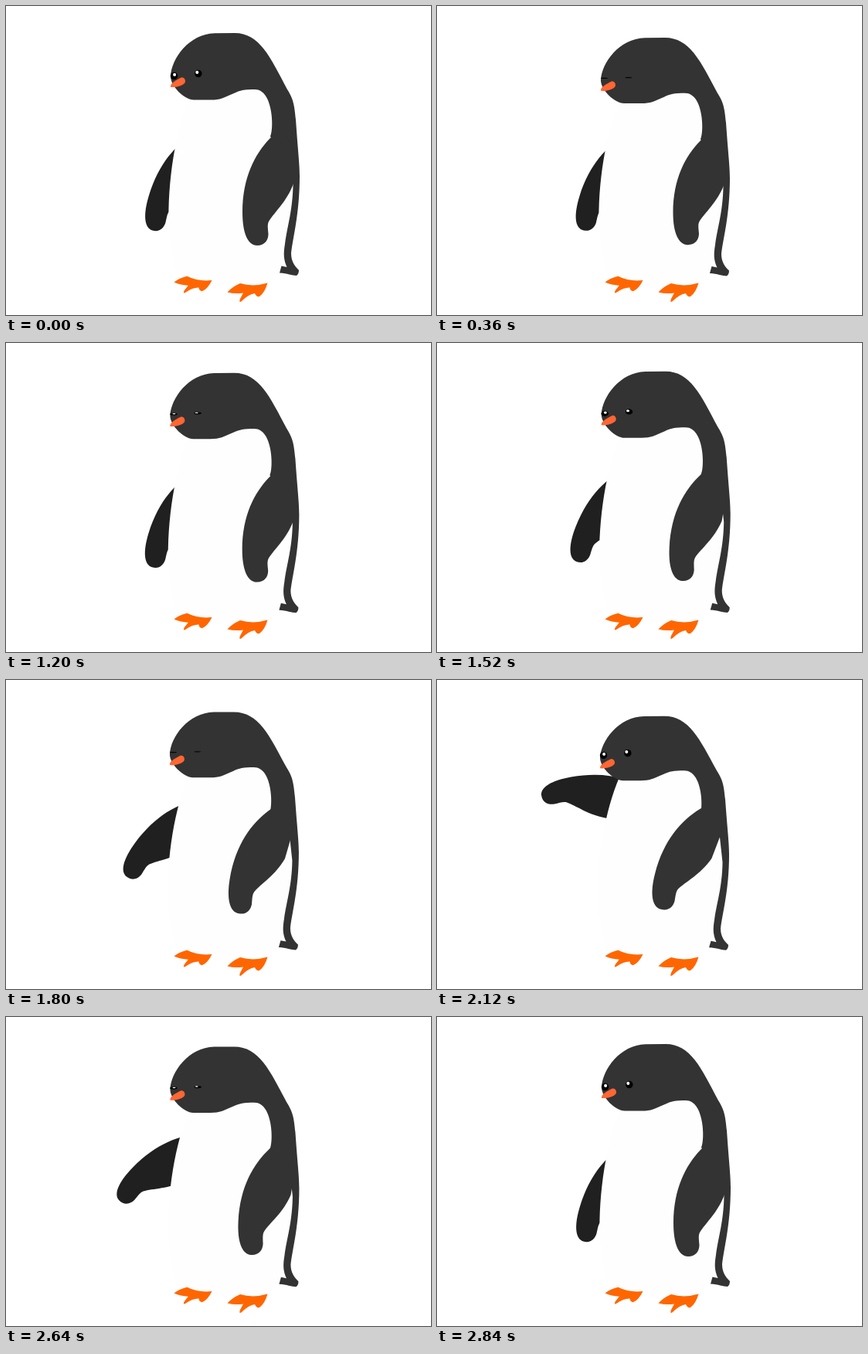
Recreate the animation shown at these times as an HTML page with a canvas. Size 550x400 px, loop 2880 ms.

```html
<!DOCTYPE html>
<html lang="en">
<head>
<meta charset="utf-8">
<title>Waving penguin</title>
<style>
html, body { margin: 0; width: 100%; height: 100%; overflow: hidden; background: #fff; }
canvas { display: block; }
</style>
</head>
<body>
<canvas id="stage" width="550" height="400"></canvas>
<script>
const ctx = document.getElementById('stage').getContext('2d');
const STEP = 40, STEPS = 72, HALF_BOB = 17.75;

const head = 'M213 91C214 68 237 36 270 35.2L296 35C328 35 342 66 364 108';
const back = 'C372 121 373 127 375 147C378 190 380 205 380 220C380 270 371 300 369 320';
const tail = 'C369 331 374 337 379 342Q379 347 376 349C370 349 364 346 354 345.5L356.5 336.5L363.5 338';
const inner = 'C359 328 359 320 361 308C364 285 371 265 371.5 231L368 198L342 169';
const chin = 'C347 160 346 108 322 108C308 108 303 109 295 113C281 119 278 121.5 265 121.5L243 121.5C231 121.5 213 104 213 91Z';
const body = new Path2D(head + back + tail + inner + chin);
const belly = new Path2D('M242 108C222 150 210 215 210.5 275C211 305 216 325 222 350Q285 372 338 359C380 330 376 200 340 100Z');
const beak = new Path2D('M213 104C213 100 220 96 227 92.5C231 91.5 233.5 97 231 100C227 104 219 105.5 213 105Z');

// Wing hangs from 0,0; foot starts at the outer toe
const wing = new Path2D('M-3 -10Q-10 0 -18 7C-37 27 -53 57 -53 102C-53 129 -46 145 -34 145C-24 145 -19.5 138 -19.5 130C-20 123 -21 118 -19 114C-12 102 4 89 13 65L17 30Z');
const foot = new Path2D('M0 0Q5.5 -6.5 16.5 -11.5Q33.5 -6.5 52 -12Q48.5 .5 41.5 5.5Q37.5 6.5 35.5 1.5Q27.5 2.5 18.5 11.5Q14.5 14.5 16.5 8.5L20.5 1Q9.5 2.5 0 0Z');

// Wing angles in degrees: [step, angle], linear between keys
const farSwing = [[0, 17], [35, 17], [44, 31], [53, 80], [62, 66], [71, 17]];
const nearSwing = [[0, 0], [35, 0], [44, 9], [53, 14.5], [62, 5.5], [71, 0]];

const mix = (a, b, k) => a + (b - a) * k;

function at(track, step) {
  const i = track.findIndex(([s]) => s > step);
  if (i < 0) return track[track.length - 1][1];
  const [s0, v0] = track[i - 1], [s1, v1] = track[i];
  return mix(v0, v1, (step - s0) / (s1 - s0));
}

function fill(path, color) {
  ctx.fillStyle = color;
  ctx.fill(path);
}

function within(place, paint) {
  ctx.save();
  place();
  paint();
  ctx.restore();
}

// Squash vertically around a fixed height
function squash(x, pivotY, sy) {
  ctx.translate(x, pivotY * (1 - sy));
  ctx.scale(1, sy);
}

function turn(x, y, degrees) {
  ctx.translate(x, y);
  ctx.rotate(degrees * Math.PI / 180);
}

function ellipse(x, y, rx, ry, color) {
  ctx.fillStyle = color;
  ctx.beginPath();
  ctx.ellipse(x, y, rx, ry, 0, 0, Math.PI * 2);
  ctx.fill();
}

function drawEye(x, y, open, glint) {
  ellipse(x, y, 4.7, 4.8 * open, '#000');
  if (open > 0.2) ellipse(x + glint, y - 1.6 * open, 2, 2.1 * open, '#fff');
}

function draw(step) {
  const beat = step / HALF_BOB, phase = beat % 1;
  const dip = 1 - Math.abs(beat % 2 - 1);
  const open = Math.max(0.13, phase < 0.56 ? 1 - phase / 0.56 : (phase - 0.56) / 0.44);
  const sag = step < 35 ? dip : 0;
  const ride = () => squash(-2 * dip, 370, 1 - 0.0358 * dip);
  const settle = () => squash(-sag, 278, 1 - 0.05 * sag);

  ctx.fillStyle = '#fff';
  ctx.fillRect(0, 0, 550, 400);

  within(() => {
    settle();
    turn(277, 176, at(farSwing, step));
    ctx.translate(-19, -7);
    ctx.scale(0.92, 0.98);
  }, () => fill(wing, '#202020'));
  within(ride, () => fill(belly, '#fefefe'));

  within(() => {
    turn(217.5, 357.5, 10);
    ctx.scale(0.92, 0.92);
  }, () => fill(foot, '#ff6600'));
  within(() => ctx.translate(286.5, 370.5), () => fill(foot, '#ff6600'));

  within(ride, () => fill(body, '#333'));
  within(() => {
    settle();
    turn(359, 165, at(nearSwing, step));
  }, () => fill(wing, '#333'));

  const shift = -2 * dip, drop = 7.2 * dip, shut = 1 - open;
  drawEye(217.5 + shift, 90.5 + drop - 0.8 * shut, open, 0.6);
  drawEye(248.8 + shift, 87.5 + drop + 1.7 * shut, open, -1.5);
  within(ride, () => fill(beak, '#ff6633'));
}

const start = performance.now();
function tick() {
  draw(Math.floor((performance.now() - start) / STEP) % STEPS);
  requestAnimationFrame(tick);
}
tick();
</script>
</body>
</html>
```
